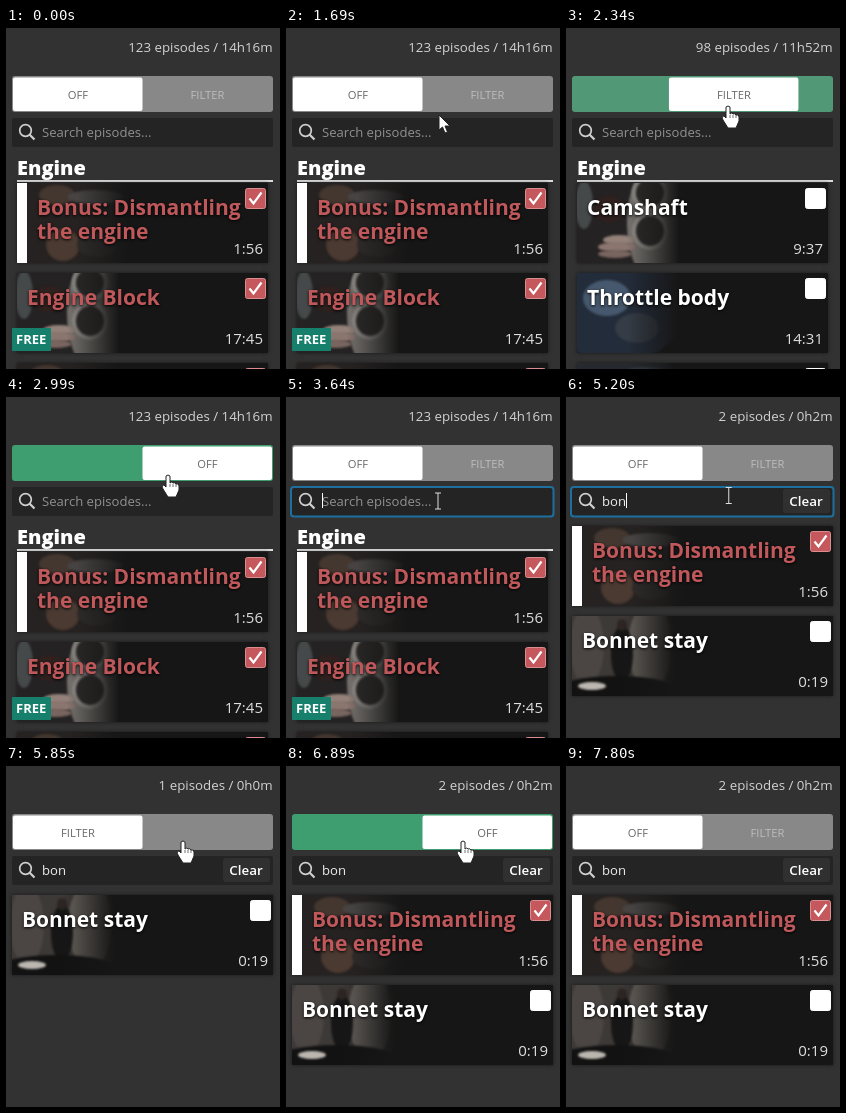
Write an HTML page with a canvas that moves like this. It is 274 px wide and 341 px high and loops after 8 s.

```html
<!DOCTYPE html>
<html lang="en">
<head>
<meta charset="utf-8">
<title>Episode filter</title>
<style>
  html, body { margin: 0; height: 100%; overflow: hidden; background: #323232; }
  canvas { display: block; }
</style>
</head>
<body>
<canvas id="stage" width="274" height="341"></canvas>
<script>
const ctx = document.getElementById('stage').getContext('2d');
const LOOP = 8000, STEP = 130, SLIDE = 390;
const FONT = '"Open Sans", "Noto Sans", sans-serif';
const RED = '#bf585b', CARD = '#161616';

// Photo shapes: x, y, rx, ry, colour, relative to the card
const photos = {
  parts: [
    [45, 40, 70, 60, '#262221'], [30, 12, 18, 10, '#44372f'], [36, 62, 17, 16, '#4b3a31'],
    [68, 14, 28, 7, '#464342'], [70, 62, 20, 12, '#2d2a29']],
  block: [
    [30, 40, 70, 60, '#242222'], [80, 40, 30, 62, '#77736f'],
    [73, 10, 18, 18, '#96918c'], [73, 10, 14, 14, '#2c2a29'],
    [73, 48, 18, 19, '#96918c'], [73, 48, 14, 15, '#2c2a29'],
    [7, 22, 9, 24, '#46494a'], [32, 26, 16, 13, '#30211f'],
    [42, 57, 16, 5, '#93817a'], [40, 64, 19, 5, '#8b766f'], [38, 71, 17, 4, '#79655f']],
  dash: [
    [40, 40, 70, 60, '#262a2f'], [32, 46, 27, 25, '#4c555e'], [32, 46, 22, 20, '#171a1e'],
    [32, 50, 10, 7, '#41474f'], [70, 12, 25, 8, '#39424a']],
  metal: [
    [40, 30, 70, 60, '#232c3a'], [30, 25, 24, 18, '#46586d'], [60, 55, 22, 15, '#353c46']],
  bonnet: [
    [45, 40, 70, 60, '#3d3937'], [78, 30, 22, 44, '#6a645e'], [15, 30, 17, 40, '#4b4643'],
    [50, 38, 11, 28, '#161616'], [50, 9, 5, 6, '#2c2523'], [45, 74, 60, 14, '#121212'],
    [20, 70, 14, 4, '#bcb6b0']]
};

const episode = (lines, time, photo, extra) => ({ lines, time, photo, ...extra });
const bonus = episode(['Bonus: Dismantling', 'the engine'], '1:56', 'parts', { watched: true, bar: true });
const engineBlock = episode(['Engine Block'], '17:45', 'block', { watched: true, free: true });
const pistons = episode(['Pistons'], '12:08', 'parts', { watched: true });
const dashboard = episode(['Dashboard'], '10:23', 'dash');
const throttle = episode(['Throttle body'], '14:31', 'metal');
const bonnet = episode(['Bonnet stay'], '0:19', 'bonnet');
const camshaft = episode(['Camshaft'], '9:37', 'block');

const lists = {
  all: { count: '123 episodes / 14h16m', heading: 'Engine', cards: [bonus, engineBlock, pistons] },
  unwatched: { count: '98 episodes / 11h52m', heading: 'Engine', cards: [camshaft, throttle, dashboard] },
  bo: { count: '37 episodes / 2h42m', cards: [bonus, dashboard, throttle] },
  bon: { count: '2 episodes / 0h2m', cards: [bonus, bonnet] },
  bonUnwatched: { count: '1 episodes / 0h0m', cards: [bonnet] }
};

// Each timeline holds [start time, value]
const listTimes = [[0, 'all'], [2080, 'unwatched'], [2990, 'all'], [4290, 'bo'],
  [4550, 'bon'], [5850, 'bonUnwatched'], [6890, 'bon']];
const queryTimes = [[0, ''], [4160, 'b'], [4290, 'bo'], [4550, 'bon']];
const clicks = [[0, 0], [2080, 1], [2990, 0], [5850, 1], [6890, 0]];
const cursorPaths = [
  [[1690, 153, 87], [1950, 162, 79], [3380, 162, 79], [3640, 152, 104], [3770, 152, 104]],
  [[5070, 158, 106], [5590, 177, 76], [7410, 177, 76], [7800, 262, 150]]
];

const last = (timeline, t) => timeline.filter(([start]) => start <= t).pop();
const mix = (a, b, p) => a + (b - a) * p;

function text(str, x, y, size, color, { weight = 400, align = 'left', shadow = false } = {}) {
  ctx.save();
  ctx.font = `${weight} ${size}px ${FONT}`;
  ctx.textAlign = align;
  ctx.fillStyle = color;
  if (shadow) { ctx.shadowColor = '#000'; ctx.shadowBlur = 3; ctx.shadowOffsetY = 1; }
  ctx.fillText(str, x, y);
  ctx.restore();
}

function box(x, y, w, h, r, fill, stroke, line = 1) {
  ctx.beginPath();
  ctx.roundRect(x, y, w, h, r);
  if (fill) { ctx.fillStyle = fill; ctx.fill(); }
  if (stroke) { ctx.strokeStyle = stroke; ctx.lineWidth = line; ctx.stroke(); }
}

function polyline(points, color, width) {
  ctx.beginPath();
  points.forEach(([x, y]) => ctx.lineTo(x, y));
  ctx.strokeStyle = color;
  ctx.lineWidth = width;
  ctx.stroke();
}

function drawPhoto(name, x, y, w) {
  ctx.save();
  ctx.beginPath();
  ctx.rect(x, y, w, 80);
  ctx.clip();
  ctx.filter = 'blur(0.8px)';
  for (const [cx, cy, rx, ry, color] of photos[name]) {
    ctx.beginPath();
    ctx.ellipse(x + cx, y + cy, rx, ry, 0, 0, 7);
    ctx.fillStyle = color;
    ctx.fill();
  }
  ctx.filter = 'none';
  const fade = ctx.createLinearGradient(x + 50, 0, x + 102, 0);
  fade.addColorStop(0, '#16161600');
  fade.addColorStop(1, CARD);
  ctx.fillStyle = fade;
  ctx.fillRect(x, y, w, 80);
  ctx.restore();
}

function drawCard(card, x, y, w) {
  const inset = card.bar ? 10 : 0;
  ctx.save();
  ctx.shadowColor = '#0008';
  ctx.shadowBlur = 4;
  box(x, y, w, 80, 0, CARD);
  ctx.restore();
  drawPhoto(card.photo, x + inset, y, w - inset);
  if (card.bar) box(x, y, 10, 80, 0, '#fff');
  card.lines.forEach((line, i) => text(line, x + 10 + inset, y + 31.5 + i * 24, 21,
    card.watched ? RED : '#fff', { weight: 700, shadow: true }));
  text(card.time, x + w - 5, y + 71, 15, '#dedede', { align: 'right' });

  const cx = x + w - 22.5, cy = y + 5.5;
  box(cx, cy, 20, 20, 2, card.watched ? '#c4585c' : '#fff', card.watched ? '#d98d8f' : '#fff');
  if (card.watched) polyline([[cx + 4, cy + 10], [cx + 8, cy + 15], [cx + 16, cy + 4]], '#fff', 2.2);
  if (card.free) {
    box(x - 5, y + 55, 39, 23, 1, '#17806d');
    text('FREE', x - 1, y + 71, 13, '#fff', { weight: 700 });
  }
}

function drawList({ count, heading, cards }) {
  text(count, 266.5, 24, 13.3, '#d2d2d2', { align: 'right' });
  const x = heading ? 11 : 6, top = heading ? 155 : 129;
  if (heading) {
    text(heading, 11, 147, 20, '#fff', { weight: 800 });
    box(11, 152, 256, 2, 0, '#dcdcdc');
  }
  cards.forEach((card, i) => drawCard(card, x, top + i * 90, heading ? 251 : 261));
}

function drawToggle(t) {
  const [start, on] = last(clicks, t);
  const progress = start ? Math.min(1, (t - start) / SLIDE) : 1;
  const eased = progress * progress * (3 - 2 * progress);
  const p = on ? eased : 1 - eased;
  const track = `rgb(${mix(136, 62, p)},${mix(136, 158, p)},${mix(136, 112, p)})`;
  box(6, 48, 261, 36, 3, track);
  if (progress === 1) text(on ? 'OFF' : 'FILTER', on ? 72 : 201.5, 70.5, 11.2, on ? '#d5eadf' : '#bdbdbd', { align: 'center' });
  const x = mix(7, 136.5, p);
  box(x, 49.5, 129.5, 33.5, 2, '#fff');
  text(on ? 'FILTER' : 'OFF', x + 65, 70.5, 11.2, '#686868', { align: 'center' });
}

function drawSearch(t) {
  const query = last(queryTimes, t)[1];
  const focused = t >= 3640 && t < 5720;
  box(6, 90, 261, 29, 2, '#242424');
  if (focused) box(5, 90, 262.5, 29.5, 3, null, '#1d6f9f', 2);
  ctx.beginPath();
  ctx.arc(19.5, 102.5, 5.8, 0, 7);
  ctx.strokeStyle = '#d0d0d0';
  ctx.lineWidth = 1.7;
  ctx.stroke();
  polyline([[23.7, 106.7], [28.5, 111.5]], '#d0d0d0', 2.2);
  text(query || 'Search episodes...', 36, 108.5, 13.1, query ? '#ececec' : '#919191');
  if (focused) {
    ctx.font = `13.1px ${FONT}`;
    box(Math.round(36 + (query && ctx.measureText(query).width)), 96, 1, 15, 0, '#fff');
  }
  if (query) {
    box(217, 92, 47, 24, 3, '#303030');
    text('Clear', 240, 108.5, 13.4, '#fff', { weight: 600, align: 'center' });
  }
}

function drawCursor(t) {
  const path = cursorPaths.find(p => t >= p[0][0] && t < p[p.length - 1][0]);
  if (!path) return;
  const i = path.findIndex(([time]) => time > t);
  const [t0, x0, y0] = path[i - 1], [t1, x1, y1] = path[i];
  const p = (t - t0) / (t1 - t0);
  const x = mix(x0, x1, p), y = mix(y0, y1, p);
  ctx.save();
  ctx.translate(x, y);
  if (y > 90 && y < 119) {
    polyline([[-3, -8], [3, -8]], '#ddd', 1);
    polyline([[0, -8], [0, 8]], '#ddd', 1);
    polyline([[-3, 8], [3, 8]], '#ddd', 1);
  } else {
    const hand = y > 48 && y < 84;
    const shape = new Path2D(hand
      ? 'M-2 0Q0-2 2 0V7Q4 5 5 7Q7 6 8 8Q11 7 11 10V14L8 21H0L-5 13Q-7 9-4 9L-2 11Z'
      : 'M0 0V15L3.5 12L6 18L8.5 17L6 11H11Z');
    ctx.fillStyle = '#fff';
    ctx.strokeStyle = '#222';
    ctx.lineWidth = 1;
    ctx.fill(shape);
    ctx.stroke(shape);
    if (hand) for (const fx of [2, 5, 8]) polyline([[fx, 8], [fx, 11]], '#333', 0.7);
  }
  ctx.restore();
}

function frame(now) {
  const t = Math.floor((now % LOOP) / STEP) * STEP;
  box(0, 0, 274, 341, 0, '#323232');
  drawList(lists[last(listTimes, t)[1]]);
  drawToggle(t);
  drawSearch(t);
  drawCursor(t);
  requestAnimationFrame(frame);
}
requestAnimationFrame(frame);
</script>
</body>
</html>
```
